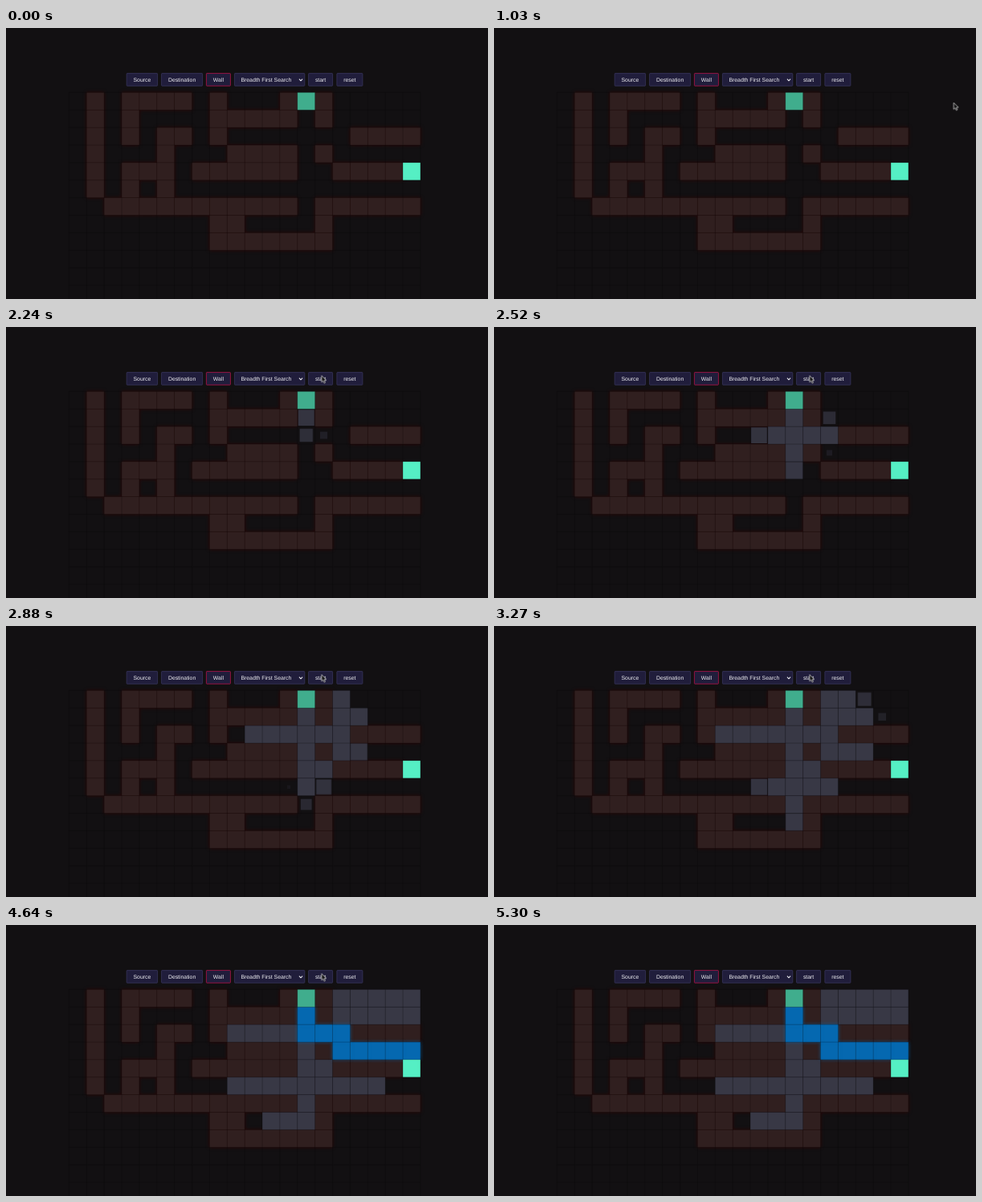
Write an HTML page that moves like this. It is 600 px wide and 338 px high and loops after 6450 ms.

```html
<!DOCTYPE html>
<html lang="en">
<head>
<meta charset="utf-8">
<title>Maze search</title>
<style>
html, body { margin: 0; width: 100%; height: 100%; overflow: hidden; background: #121012; }
svg { display: block; width: 600px; height: 338px; }
text { font: 6.875px "Liberation Sans", Arial, sans-serif; fill: #eeeef2; text-rendering: geometricPrecision; }
.button { fill: #201d3b; stroke: #38355c; stroke-width: .8; }
.active { stroke: #b3134a; }
#walls { fill: #301f1f; filter: drop-shadow(0 0 2.2px #2c0504); }
#lines { stroke: #000; stroke-opacity: .27; stroke-width: .8; }
.visit { fill: #383845; transform-box: fill-box; transform-origin: center; }
.path { fill: #0568b0; }
.visit, .path, #cursor { animation: 6450ms ease infinite both; }
#cursor { fill: #151515; stroke: #e4e4e4; stroke-width: .7; stroke-linejoin: round; }
</style>
</head>
<body>
<svg viewBox="0 0 600 338">
  <g id="buttons"></g>
  <path d="M364.9 63.7l2.1 2.1 2.1-2.1" fill="none" stroke="#eeeef2" stroke-width="1.1"/>
  <g id="walls"></g>
  <g id="visits"></g>
  <g id="route"></g>
  <g id="ends"></g>
  <path id="lines"/>
  <path id="cursor" d="M0 0V8.2L1.9 6.5 3.2 9.4 4.6 8.8 3.3 6 6 5.8Z"/>
</svg>
<script>
const LOOP = 6450, SIZE = 21.875, LEFT = 78.4, TOP = 80.4, COLS = 20, ROWS = 12;
const maze = [
  ".#.####.#...#.#.....",
  ".#.#....#####.#.....",
  ".#.#.##.#.......####",
  ".#...#...####.#.....",
  ".#.###.######..####.",
  ".#.#.#..............",
  "..###########.######",
  "........##....#.....",
  "........#######....."
];
const source = [0, 13], target = [4, 19];
const get = id => document.getElementById(id);
const pct = ms => (ms / LOOP * 100).toFixed(4) + "%";
const rules = [];

function add(parent, tag, attrs, text = "") {
  const el = document.createElementNS("http://www.w3.org/2000/svg", tag);
  for (const name in attrs) el.setAttribute(name, attrs[name]);
  el.textContent = text;
  return get(parent).appendChild(el);
}

function cell(parent, [row, col], attrs = {}) {
  return add(parent, "rect", {
    x: LEFT + col * SIZE, y: TOP + row * SIZE, width: SIZE, height: SIZE, ...attrs
  });
}

function animate(el, name, frames) {
  rules.push(`@keyframes ${name} { ${frames} }`);
  el.style.animationName = name;
}

// Breadth-first search: up, right, down, left
function search() {
  const parent = { [source]: null }, order = [], queue = [source];
  while (queue.length) {
    const here = queue.shift();
    for (const [dr, dc] of [[-1, 0], [0, 1], [1, 0], [0, -1]]) {
      const next = [here[0] + dr, here[1] + dc];
      if (`${next}` === `${target}`) {
        const route = [];
        for (let c = here; parent[c]; c = parent[c]) route.push(c);
        return { order, route };
      }
      if (maze[next[0]]?.[next[1]] !== "." || next in parent) continue;
      parent[next] = here;
      order.push(next);
      queue.push(next);
    }
  }
}

// Toolbar
[["Source", 150.2, 38.4], ["Destination", 193.6, 51], ["Wall", 249.4, 30],
 ["Breadth First Search", 284.4, 87.4], ["start", 376.6, 30], ["reset", 411.9, 32]
].forEach(([label, x, width]) => {
  const isSelect = width > 80;
  add("buttons", "rect", {
    x, y: 56.6, width, height: 15.6, rx: .6,
    class: label === "Wall" ? "button active" : "button"
  });
  add("buttons", "text", {
    x: isSelect ? 292.4 : x + width / 2, y: 66.8,
    "text-anchor": isSelect ? "start" : "middle"
  }, label);
});

// Grid
maze.forEach((line, row) => [...line].forEach((c, col) => {
  if (c === "#") cell("walls", [row, col]);
}));
let d = "";
for (let c = 0; c <= COLS; c++) d += `M${LEFT + c * SIZE} ${TOP}V338`;
for (let r = 0; r < ROWS; r++) d += `M${LEFT} ${TOP + r * SIZE}h${COLS * SIZE}`;
get("lines").setAttribute("d", d);
cell("ends", source, { fill: "#40ad8d" });
cell("ends", target, { fill: "#55efc4" });

// Search, then the route back
const { order, route } = search();
order.forEach((pos, i) => {
  const t = 2109 + i * 41.1;
  animate(cell("visits", pos, { class: "visit" }), "visit" + i,
    `0%, ${pct(t)} { transform: scale(0); opacity: 0 }
     ${pct(t + 200)}, 100% { transform: none; opacity: 1 }`);
});
route.forEach((pos, i) => {
  const t = 3650 + i * 40;
  animate(cell("route", pos, { class: "path" }), "path" + i,
    `0%, ${pct(t)} { opacity: 0; filter: drop-shadow(0 0 0 #0568b000) }
     ${pct(t + 1)} { opacity: 1; filter: drop-shadow(0 0 0 #0568b000) }
     ${pct(t + 220)}, 100% { opacity: 1; filter: drop-shadow(0 0 2px #0568b0b0) }`);
});

// Pointer: time, x, y, easing to the next stop
const stops = [
  [970, 590, 97, "ease-in"], [1130, 500, 78, "linear"], [1270, 390, 54, "ease-out"],
  [1430, 329, 44, "ease-in"], [1610, 372, 56.5, "linear"], [1640, 381, 58, "ease-out"],
  [1760, 392.8, 60.6, "linear"], [4670, 392.8, 60.6, "ease-in-out"], [5270, 555.3, 108.4, "linear"]
];
const show = (t, x, y, opacity, ease = "linear") =>
  `${pct(t)} { transform: translate(${x}px, ${y}px); opacity: ${opacity}; animation-timing-function: ${ease} }`;
animate(get("cursor"), "point", [
  show(0, 590, 97, 0), show(969, 590, 97, 0),
  ...stops.map(([t, x, y, ease]) => show(t, x, y, 1, ease)),
  show(5299, 555.3, 108.4, 1), show(5300, 555.3, 108.4, 0), show(LOOP, 555.3, 108.4, 0)
].join("\n"));

document.head.appendChild(document.createElement("style")).textContent = rules.join("\n");
</script>
</body>
</html>
```
